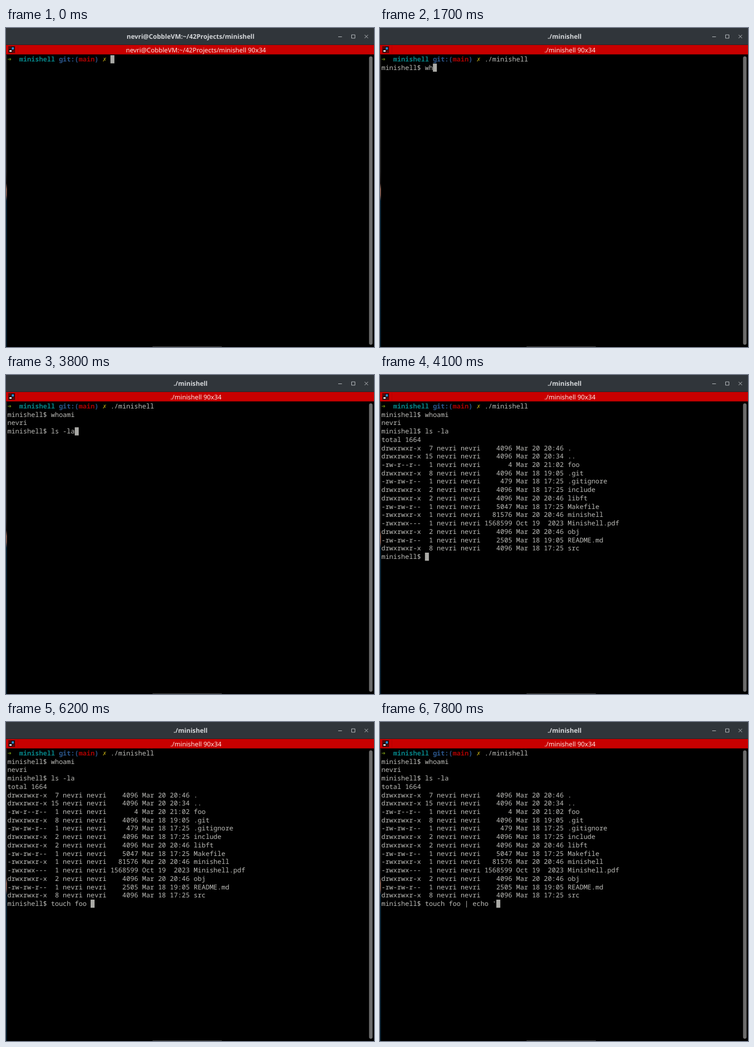
Animation of 648 by 562 pixels, one loop 8000 ms. Source, as an HTML page with a canvas:

```html
<!DOCTYPE html>
<html lang="en">
<head>
<meta charset="utf-8">
<title>minishell</title>
<style>
  html, body { margin: 0; width: 100%; height: 100%; overflow: hidden; background: #000; }
  canvas { display: block; }
</style>
</head>
<body>
<canvas id="stage" width="648" height="562"></canvas>
<script>
const ctx = document.getElementById('stage').getContext('2d');
ctx.textRendering = 'geometricPrecision';

const LOOP = 8000;
const CELL = 6.98, LINE = 14.72, LEFT = 2.4, BASELINE = 59;
const MONO = '11.63px "Noto Sans Mono", "DejaVu Sans Mono", "DejaVu Sans", monospace';
const SANS = '11.3px "Noto Sans", sans-serif';
const GREY = '#bcbcb8';
const USER = 'nevri';
const PATH = USER + '@CobbleVM:~/42Projects/minishell';
const LAUNCH = 1200, LISTED = 4100;

// Coloured pieces of the outer shell prompt: column, text, colour
const shellPrompt = [
  [0, '➜', '#6c8a12'],
  [3, 'minishell', '#068386'],
  [13, 'git:(', '#2b568c'],
  [18, 'main', '#ac0000'],
  [22, ')', '#2b568c'],
  [24, '✗', '#ac9810'],
];

// One key time per typed character
const commands = [
  { at: 0, row: 0, col: 26, text: './minishell',
    keys: [100, 200, 300, 400, 500, 700, 800, 900, 1000, 1100, 1100] },
  { at: LAUNCH, row: 1, col: 11, text: 'whoami',
    keys: [1600, 1700, 1900, 2000, 2200, 2300] },
  { at: 2700, row: 3, col: 11, text: 'ls -la',
    keys: [2900, 3400, 3600, 3700, 3800, 3800] },
  { at: LISTED, row: 18, col: 11, text: "touch foo | echo '",
    keys: [4600, 4700, 4800, 4900, 4900, 5100, 5600, 5600, 5800, 6200, 6500,
           6900, 6900, 7300, 7400, 7500, 7600, 7800] },
];

const listing = [
  ['drwxrwxr-x', 7, 4096, 'Mar 20 20:46', '.'],
  ['drwxrwxr-x', 15, 4096, 'Mar 20 20:34', '..'],
  ['-rw-r--r--', 1, 4, 'Mar 20 21:02', 'foo'],
  ['drwxrwxr-x', 8, 4096, 'Mar 18 19:05', '.git'],
  ['-rw-rw-r--', 1, 479, 'Mar 18 17:25', '.gitignore'],
  ['drwxrwxr-x', 2, 4096, 'Mar 18 17:25', 'include'],
  ['drwxrwxr-x', 2, 4096, 'Mar 20 20:46', 'libft'],
  ['-rw-rw-r--', 1, 5047, 'Mar 18 17:25', 'Makefile'],
  ['-rwxrwxr-x', 1, 81576, 'Mar 20 20:46', 'minishell'],
  ['-rwxrwx---', 1, 1568599, 'Oct 19  2023', 'Minishell.pdf'],
  ['drwxrwxr-x', 2, 4096, 'Mar 20 20:46', 'obj'],
  ['-rw-rw-r--', 1, 2505, 'Mar 18 19:05', 'README.md'],
  ['drwxrwxr-x', 8, 4096, 'Mar 18 17:25', 'src'],
].map(([mode, links, size, date, name]) =>
  `${mode} ${String(links).padStart(2)} ${USER} ${USER} ${String(size).padStart(7)} ${date} ${name}`);

function box(x, y, w, h, color) {
  ctx.fillStyle = color;
  ctx.fillRect(x, y, w, h);
}

function put(row, col, text, color = GREY) {
  ctx.fillStyle = color;
  [...text].forEach((ch, i) => {
    if (ch !== ' ') ctx.fillText(ch, LEFT + (col + i) * CELL, BASELINE + row * LINE);
  });
}

function drawCaption(text, x, y, font, color) {
  ctx.font = font;
  ctx.textAlign = 'center';
  ctx.fillStyle = color;
  ctx.fillText(text, x, y);
  ctx.textAlign = 'left';
}

function drawWindow(t) {
  box(0, 0, 648, 562, '#000');

  // Sliver of desktop beside the window
  const edge = ctx.createLinearGradient(0, 47, 0, 562);
  edge.addColorStop(0, '#2b2b2b');
  edge.addColorStop(0.4, '#262626');
  edge.addColorStop(0.44, '#181414');
  edge.addColorStop(0.46, '#a0705f');
  edge.addColorStop(0.48, '#8f6458');
  edge.addColorStop(0.5, '#0b2a3e');
  edge.addColorStop(1, '#061f30');
  box(0, 47, 1.6, 515, edge);
  box(258, 561, 122, 1, '#484848');

  box(0, 0, 648, 30, '#30353a');
  box(0, 29, 648, 1, '#2a2529');
  box(0, 30, 648, 16.5, '#c80000');
  box(20.5, 31, 1, 14, '#b80000');

  // Group button
  box(4, 32, 12, 12, '#5a0608');
  box(5, 37, 6, 6, '#140808');
  box(9, 33, 6, 6, '#140808');
  box(6, 39, 4, 3, '#d8d0d0');
  box(10, 34, 4, 4, '#2a86c4');

  // Window buttons
  ctx.strokeStyle = '#b0b4b8';
  ctx.lineWidth = 1;
  ctx.beginPath();
  ctx.moveTo(585, 15.5);
  ctx.lineTo(591.5, 15.5);
  ctx.rect(608.5, 12, 6, 6);
  ctx.moveTo(631.5, 12);
  ctx.lineTo(637.5, 18);
  ctx.moveTo(637.5, 12);
  ctx.lineTo(631.5, 18);
  ctx.stroke();

  // Scrollbar
  ctx.fillStyle = '#6c6c6c';
  ctx.beginPath();
  ctx.roundRect(639.3, 50, 6.2, 508, 3);
  ctx.fill();

  const title = t < LAUNCH ? PATH : './minishell';
  drawCaption(title, 325, 19, 'bold ' + SANS, '#d4d7da');
  drawCaption(title + ' 90x34', 334.5, 42.5, SANS, '#ffe6e2');
}

function drawTerminal(t) {
  ctx.font = 'bold ' + MONO;
  for (const [col, text, color] of shellPrompt) put(0, col, text, color);

  ctx.font = '500 ' + MONO;
  let cursor;
  for (const { at, row, col, text, keys } of commands) {
    if (t < at) break;
    if (row > 0) put(row, 0, 'minishell$');
    const typed = keys.filter(time => time <= t).length;
    put(row, col, text.slice(0, typed));
    cursor = { row, col: col + typed };
  }
  if (t >= 2700) put(2, 0, USER);
  if (t >= LISTED) {
    put(4, 0, 'total 1664');
    listing.forEach((line, i) => put(5 + i, 0, line));
  }
  box(LEFT + cursor.col * CELL, 48 + cursor.row * LINE, CELL, 14.3, '#aaaaa6');
}

const start = performance.now();
function frame() {
  const t = (performance.now() - start) % LOOP;
  drawWindow(t);
  drawTerminal(t);
  requestAnimationFrame(frame);
}
frame();
</script>
</body>
</html>
```
